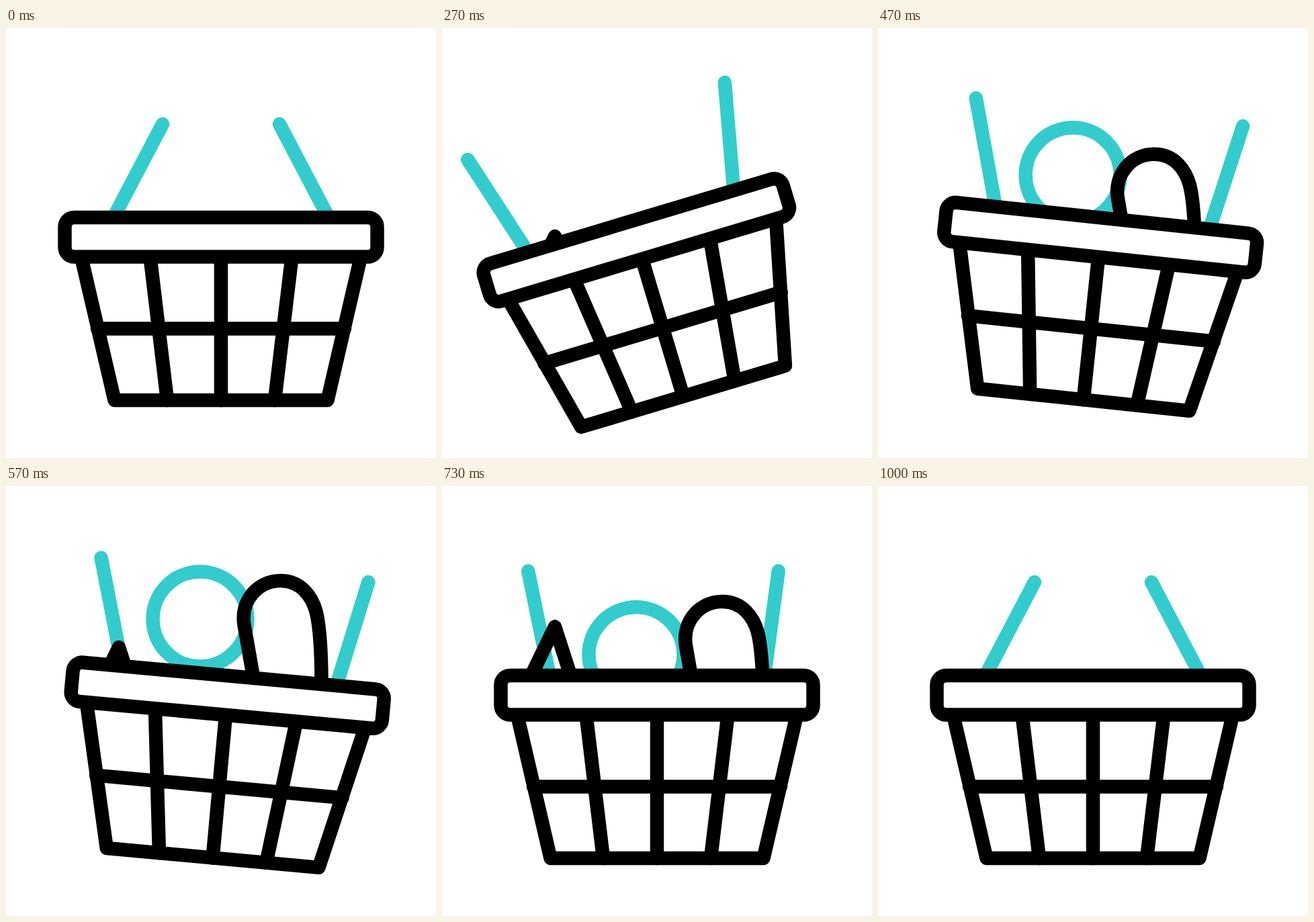
Write an HTML page that moves like this. It is 640 by 640 pixels and loops after 1.67 s.

```html
<!DOCTYPE html>
<html lang="en">
<head>
<meta charset="utf-8">
<title>Basket</title>
<style>
  html, body { margin: 0; width: 100%; height: 100%; overflow: hidden; background: #fff; }
  svg { display: block; width: 100%; height: 100%; }
  .line { fill: none; stroke: #000; stroke-width: 20.5; stroke-linecap: round; stroke-linejoin: round; }
  .teal { stroke: #3cc; }
</style>
</head>
<body>
<svg viewBox="0 0 640 640">
  <defs>
    <clipPath id="above"><rect id="opening" x="-200" y="-300" width="1040" height="582"/></clipPath>
  </defs>
  <path id="handles" class="line teal"/>
  <g clip-path="url(#above)">
    <circle id="ball" class="line teal" r="70.5"/>
    <path id="cone" class="line" d="M107 336 L168 210 L208.5 336"/>
    <path id="loop" class="line" d="M376 312 L363 238 C357 202 383 172 417 172 C448 172 464 196 470 218 C475 238 478 280 478 330"/>
  </g>
  <g id="basket" class="line">
    <path d="M112 341 L161.5 554 H478.5 L528 341"/>
    <path d="M136 447.5 H504 M214.5 341 L240 554 M320 341 V554 M425.5 341 L400 554"/>
    <rect x="87.5" y="282" width="465" height="58.5" rx="14" fill="#fff"/>
  </g>
</svg>
<script>
  const LOOP = 1670, LAST = 30;
  const $ = id => document.getElementById(id);
  const smooth = u => u * u * (3 - 2 * u);
  const easeOut = u => 1 - (1 - u) * (1 - u);
  const mix = (a, b, u) => a + (b - a) * u;

  // Each key: [step, value, ease used to arrive there]
  function track(step, keys) {
    if (step <= keys[0][0]) return keys[0][1];
    for (let i = 1; i < keys.length; i++) {
      const [s0, v0] = keys[i - 1], [s1, v1, ease = smooth] = keys[i];
      if (step < s1) return mix(v0, v1, ease((step - s0) / (s1 - s0)));
    }
    return keys[keys.length - 1][1];
  }

  const tilt = [[0, 0], [7.6, -16.9], [15, 7.2], [20.8, 0]];
  const spread = [[1.4, 0], [8, 1], [19.8, 1], [30, 0]];
  const ballX = [[8, 299], [17, 289, easeOut]];
  const ballY = [[8, 385], [17, 198, easeOut], [30, 358]];
  const loopX = [[11, 0], [17.5, -8.5, easeOut], [18.5, -8.5], [30, 30]];
  const loopY = [[11, 133], [17.5, -32, easeOut], [18.5, -32], [30, 113]];
  const coneY = [[14.55, 100], [20.5, -7, easeOut], [30, 88]];

  const move = (id, x, y) => $(id).setAttribute("transform", `translate(${x} ${y})`);

  function draw(step) {
    const turn = `rotate(${track(step, tilt)} 320 418)`;
    for (const id of ["basket", "opening", "handles"]) $(id).setAttribute("transform", turn);

    const open = track(step, spread);
    const y = mix(143, 124.3, open);
    $("handles").setAttribute("d",
      `M160 282 L${mix(233, 114, open)} ${y} M480 282 L${mix(407, 513.4, open)} ${y}`);

    move("ball", track(step, ballX), track(step, ballY));
    move("loop", track(step, loopX), track(step, loopY));
    move("cone", 0, track(step, coneY));
  }

  // Thirty steps a second, on a clock of 10 ms ticks
  const start = performance.now();
  function tick() {
    const ticks = Math.floor(((performance.now() - start) % LOOP) / 10);
    draw(Math.min(LAST, Math.floor((ticks + 0.5) * 0.3)));
    requestAnimationFrame(tick);
  }
  tick();
</script>
</body>
</html>
```
